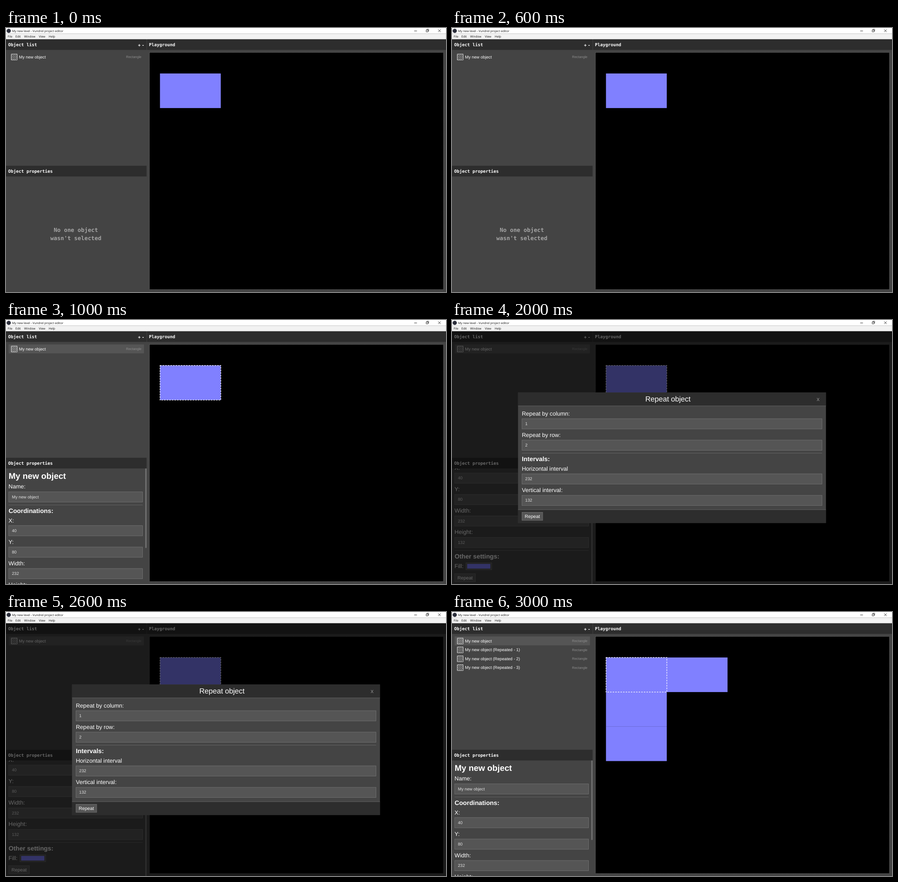
Animation, 965 px wide and 580 px high, one loop 4 s. Source, as an HTML page:

```html
<!DOCTYPE html>
<html lang="en">
<head>
<meta charset="utf-8">
<title>Level editor</title>
<style>
  html, body { margin: 0; width: 100%; height: 100%; overflow: hidden; background: #444; }
  svg { display: block; }
  text { font-family: "Liberation Sans", Arial, sans-serif; text-rendering: geometricPrecision; white-space: pre; }
  .ui { font-family: "Open Sans", sans-serif; }
  .mono { font-family: "DejaVu Sans Mono", monospace; font-weight: bold; }
  .bold { font-weight: bold; }
</style>
</head>
<body>
<svg id="stage" width="965" height="580" viewBox="0 0 965 580"></svg>
<script>
const stage = document.getElementById("stage");
const STEP = 1000;
const BLUE = "#8080ff";

const rect = (x, y, w, h, fill, extra = "") =>
  `<rect x="${x}" y="${y}" width="${w}" height="${h}" fill="${fill}" ${extra}/>`;
const text = (s, x, y, size, fill = "#fff", cls = "", anchor = "start") =>
  `<text x="${x}" y="${y}" font-size="${size}" fill="${fill}" class="${cls}" text-anchor="${anchor}">${s}</text>`;
const path = (d, stroke, width = 1) =>
  `<path d="${d}" fill="none" stroke="${stroke}" stroke-width="${width}"/>`;
const label = (s, x, y) => text(s, x, y, 12.65);
const heading = (s, x, y) => text(s, x, y, 13.8, "#fff", "bold");
const rule = (x, y, w) => rect(x, y, w, 0.8, "#6c6c6c");
const box = (x, y, w, h) => rect(x + 0.5, y + 0.5, w - 1, h - 1, "#555", 'stroke="#717171" stroke-width="0.9"');
const input = (value, x, y, w) => box(x, y, w, 23.4) + text(value, x + 7.6, y + 14.6, 9.2, "#e4e4e4");
const field = (name, value, x, y, w) => label(name, x + 0.2, y) + input(value, x, y + 6.7, w);
const button = (x, y) => box(x, y, 46.4, 18.6) + text("Repeat", x + 6.6, y + 13, 10.35);

function titleBar() {
  const menu = [["File", 3.6], ["Edit", 20.8], ["Window", 39.8], ["View", 72], ["Help", 93.7]];
  return rect(0, 0, 965, 12.5, "#fff") + rect(0, 12.5, 965, 12.3, "#f2f2f2") +
    '<circle cx="6" cy="6.3" r="4.6" fill="#2b2e3b"/>' +
    text("My new level - Vundrel project editor", 13.3, 8.9, 6.62, "#111", "ui") +
    menu.map(([s, x]) => text(s, x, 21.3, 6.55, "#111", "ui")).join("") +
    path("M895.3 6.5h6M921.5 4.5h4v4h-4zM923 4.2v-1.4h4v4h-1.3M947.8 3.2l5.6 5.6M953.4 3.2l-5.6 5.6", "#222", 0.9);
}

function headers() {
  const title = (s, x, y) => text(s, x, y, 9.56, "#fff", "mono");
  return rect(0, 24.8, 308.4, 23.4, "#2d2d2d") + rect(309.3, 24.8, 656, 23.4, "#2d2d2d") +
    rect(0, 302.6, 308.4, 23.6, "#2d2d2d") +
    title("Object list", 4.7, 39.8) + title("+", 289.6, 40.6) + title("-", 297.7, 40.8) +
    title("Playground", 313.6, 39.8) + title("Object properties", 4.7, 317.8);
}

function listRow(name, i, selected) {
  const y = 53.7 + i * 19.5;
  let hatch = `M11.5 ${y + 3.5}h13v13h-13z`;
  for (const d of [4, 8, 12]) hatch += `M11.5 ${y + 3.5 + d}l${d} ${-d}`;
  for (const d of [3, 7]) hatch += `M${11.5 + d} ${y + 16.5}l${13 - d} ${d - 13}`;
  return (selected ? rect(5.6, y, 297, 19.6, "#555") : "") + path(hatch, "#e4e4e4", 0.9) +
    text(name, 28.5, y + 12.9, 9.2) + text("Rectangle", 297, y + 12.3, 7.5, "#8c8c8c", "", "end");
}

function properties(scroll) {
  const body = text("My new object", 5.8, 348.6, 18.4, "#fff", "bold") +
    field("Name:", "My new object", 5.4, 370.4, 294.6) + rule(5.6, 405.9, 294.2) +
    heading("Coordinations:", 5.7, 423.8) +
    [["X:", 40], ["Y:", 80], ["Width:", 232], ["Height:", 132]]
      .map(([name, value], i) => field(name, value, 5.4, 444.5 + i * 47.15, 294.6)).join("") +
    rule(5.6, 621.6, 294.2) + heading("Other settings:", 5.7, 639.2) + label("Fill:", 5.6, 660) +
    box(29.8, 648.4, 57.8, 16.4) + rect(33.3, 651.4, 50.8, 10.2, BLUE) + button(5.4, 672.3);
  return '<clipPath id="pane"><rect y="326.2" width="308.4" height="254"/></clipPath>' +
    `<g clip-path="url(#pane)"><g transform="translate(0 ${-scroll})">${body}</g></g>` +
    rect(305.4, 326.2 + scroll * 0.686, 3, 174.6, "#707070");
}

function emptyNote() {
  return text("No one object", 153.3, 448, 12.4, "#a5a5a5", "mono", "middle") +
    text("wasn't selected", 153.3, 466, 12.4, "#a5a5a5", "mono", "middle");
}

function playground(selected, repeated) {
  const block = (col, row) => rect(337.7 + col * 133.3, 99.9 + row * 75.8, 133.3, 76, BLUE);
  const cells = repeated ? [[0, 0], [1, 0], [0, 1], [0, 2]] : [[0, 0]];
  return rect(314.6, 53.8, 644.8, 520.8, "#000", 'stroke="#8c8c8c" stroke-width="0.7" stroke-dasharray="1.7 1.2"') +
    cells.map(c => block(...c)).join("") +
    (selected ? rect(337.8, 99.9, 133.4, 76, "none", 'stroke="#fff" stroke-width="1.2" stroke-dasharray="3.4 2.3"') : "");
}

function dialog() {
  const fields = [["Repeat by column:", 1, 209.7], ["Repeat by row:", 2, 256.7],
    ["Horizontal interval", 232, 330.8], ["Vertical interval:", 132, 378]];
  return rect(0, 24.8, 965, 556, "#000", 'opacity="0.6"') +
    rect(144.8, 159.3, 675.4, 286.8, "#444") + rect(144.8, 159.3, 675.4, 29.4, "#2d2d2d") +
    rect(144.8, 416.8, 675.4, 29.3, "#2d2d2d") +
    rule(144.8, 188.4, 675.4) + rule(144.8, 416.4, 675.4) +
    text("Repeat object", 424, 179.2, 16.1) + text("x", 799.8, 178, 12.65, "#8c8c8c") +
    fields.map(([name, value, y]) => field(name, value, 153, y, 658.9)).join("") +
    rule(153.2, 292.1, 658.5) + heading("Intervals:", 153.2, 310.2) + button(153, 422);
}

function scene(step) {
  const selected = step > 0, modal = step === 2, repeated = step === 3;
  const names = ["My new object"];
  if (repeated) for (let i = 1; i < 4; i++) names.push(`My new object (Repeated - ${i})`);
  return rect(0, 0, 965, 580, "#444") + titleBar() + headers() +
    names.map((name, i) => listRow(name, i, selected && i === 0)).join("") +
    (selected ? properties(modal ? 115.5 : 0) : emptyNote()) +
    playground(selected, repeated) + (modal ? dialog() : "");
}

let shown = -1;
function draw() {
  const step = Math.floor(performance.now() / STEP) % 4;
  if (step !== shown) stage.innerHTML = scene(shown = step);
  requestAnimationFrame(draw);
}
draw();
</script>
</body>
</html>
```
